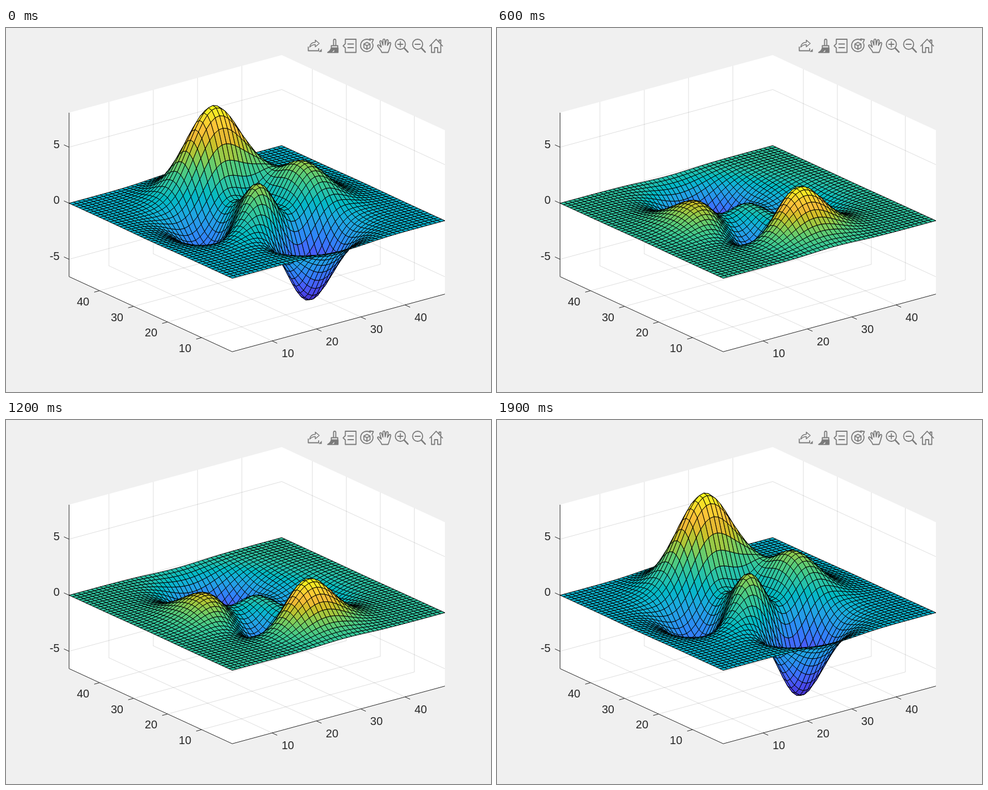
Write an HTML page with a canvas that moves like this. It is 864 px wide and 648 px high and loops after 2000 ms.

```html
<!DOCTYPE html>
<html lang="en">
<head>
<meta charset="utf-8">
<title>Oscillating surface</title>
<style>
  html, body { margin: 0; width: 100%; height: 100%; overflow: hidden; background: #f0f0f0; }
  svg, canvas { position: absolute; left: 0; top: 0; width: 864px; height: 648px; }
  text { font: 20px "Liberation Sans", Arial, sans-serif; fill: #262626; dominant-baseline: central; }
  .grid { stroke: #262626; stroke-opacity: .15; fill: none; }
  .axis { stroke: #262626; fill: none; }
  .icons { fill: none; stroke: #7b7b7b; stroke-width: 1.8; stroke-linejoin: round; stroke-linecap: round; }
  .icons .solid { fill: #7b7b7b; stroke: none; }
</style>
</head>
<body>
<svg viewBox="0 0 864 648">
  <g id="axes"></g>
  <g class="icons">
    <!-- export -->
    <path d="M541 34C542 28 546 25.500 551 25.500V21.500L558 27.500L551 33.500V29.500C547 29.500 544 31 541 34Z" stroke-width="1.500"/>
    <path d="M538.500 34V40.500H557V37"/>
    <path class="solid" d="M562.500 37V42.500H557Z"/>
    <!-- brush -->
    <path d="M583.500 31V22Q583.500 20 585.500 20T587.500 22V31M579.500 31.500H591V35.500H579.500ZM579.500 35.500Q578 41 573 43.500H591.500V35.500"/>
    <path class="solid" d="M579.500 35H591.500V43.500H584L585 39L580 43.500H574Q578 40 579.500 35Z"/>
    <!-- data tip -->
    <path d="M604.500 20H623.500V43.500H604.500V35.500L600.500 31.800L604.500 28ZM609 28.500H619M609 35H619"/>
    <!-- rotate -->
    <path d="M649 22A11 11 0 1 0 653.300 28M648 19.500L654.500 20.500L652 26.500"/>
    <path d="M643 25.500L648.500 28.500V35L643 38L637.500 35V28.500ZM637.500 28.500L643 31.500L648.500 28.500M643 31.500V38"/>
    <!-- pan -->
    <path d="M669.500 43.500C668 39 664 35.500 662 32C661.500 29.500 664.500 29.500 666 31.500L668.500 34L666 24.500C666 22 668.800 21.800 669.500 24.500L671.500 30.500L671.500 21.500C672 19 674.800 19 675 21.500L675.500 30L677.500 22C678.500 20 681 20.500 680.800 23L679.500 31L682.500 26.500C684 25 686 26 685.300 28.500C684 33 683 39 680.500 43.500Z"/>
    <!-- zoom in, zoom out -->
    <circle cx="702.500" cy="29" r="9"/>
    <path d="M702.500 24.500V33.500M698 29H707"/>
    <path d="M709.500 36L716 42.800" stroke-width="2.600"/>
    <circle cx="733.300" cy="29" r="9"/>
    <path d="M728.800 29H737.800"/>
    <path d="M740.300 36L746.800 42.800" stroke-width="2.600"/>
    <!-- home -->
    <path d="M755 32L766.300 20L777.600 32M758 30V43.500H763.500V35H769V43.500H774.500V30M774.500 27V21.500H771.500V24.500" />
  </g>
</svg>
<canvas id="surface" width="864" height="648"></canvas>
<script>
const SIZE = 49, STEP_MS = 100, STEPS = 20;
const STOPS = ('3e26a8 4332cb 4741e5 4852f4 4563fd 3875fe 2e87f7 2797eb 20a5e3 12b1d6 02bac3 ' +
  '24c1ae 37c897 57cc7a 81cc59 abc739 d1bf27 f0ba36 fec338 fad62d f5e924 f9fb15')
  .split(' ').map(hex => [0, 2, 4].map(k => parseInt(hex.slice(k, k + 2), 16)));

function peaks(x, y) {
  return 3 * (1 - x) ** 2 * Math.exp(-x * x - (y + 1) ** 2)
    - 10 * (x / 5 - x ** 3 - y ** 5) * Math.exp(-x * x - y * y)
    - Math.exp(-((x + 1) ** 2) - y * y) / 3;
}

// heights[column][row]
const heights = Array.from({ length: SIZE }, (_, i) =>
  Array.from({ length: SIZE }, (_, j) => peaks(i / 8 - 3, j / 8 - 3)));
const zMin = Math.min(...heights.flat()), zMax = Math.max(...heights.flat());

// Orthographic projection of data coordinates (x and y run from 1 to 49)
function project(x, y, z) {
  const u = (x - 1) / 48, v = (y - 1) / 48, w = (z - zMin) / (zMax - zMin);
  return [403 + 378.9 * u - 290.7 * v, 576.3 - 102.6 * u - 133.7 * v - 291.8 * w];
}

function buildAxes() {
  const parts = [];
  const path = (cls, ...pts) => parts.push(`<path class="${cls}" d="M${pts.map(p => p.map(n => n.toFixed(2))).join('L')}"/>`);
  const tick = (p, dx, dy) => path('axis', p, [p[0] + dx, p[1] + dy]);
  const label = (value, x, y, anchor) => parts.push(`<text x="${x}" y="${y}" text-anchor="${anchor}">${value}</text>`);
  const left = project(1, 49, zMin), front = project(1, 1, zMin), right = project(49, 1, zMin);
  const walls = [left, project(1, 49, zMax), project(49, 49, zMax), project(49, 1, zMax), right, front];
  parts.push(`<polygon fill="#fff" points="${walls.join(' ')}"/>`);

  for (const n of [10, 20, 30, 40]) {
    const px = project(n, 1, zMin), py = project(1, n, zMin);
    path('grid', px, project(n, 49, zMin), project(n, 49, zMax));
    path('grid', py, project(49, n, zMin), project(49, n, zMax));
    tick(px, 9.1, 4.2);
    tick(py, -9.7, 2.6);
    label(n, px[0] + 28, px[1] + 22, 'middle');
    label(n, py[0] - 29.5, py[1] + 19, 'middle');
  }
  for (const z of [-5, 0, 5]) {
    const p = project(1, 49, z);
    path('grid', p, project(49, 49, z), project(49, 1, z));
    tick(p, -9.1, -4.2);
    label(z, 95.5, p[1] - 5.5, 'end');
  }
  path('axis', project(1, 49, zMax), left, front, right);
  document.getElementById('axes').innerHTML = parts.join('');
}

function colorAt(level) {
  const pos = Math.min(Math.floor(level * 256), 255) / 255 * (STOPS.length - 1);
  const k = Math.min(Math.floor(pos), STOPS.length - 2);
  return `rgb(${STOPS[k].map((c, n) => Math.round(c + (STOPS[k + 1][n] - c) * (pos - k)))})`;
}

const ctx = document.getElementById('surface').getContext('2d');
ctx.lineWidth = 1;
ctx.lineJoin = 'round';
ctx.strokeStyle = '#000';

function drawSurface(step) {
  const scale = Math.cos(2 * Math.PI * step / STEPS);
  const points = heights.map((col, i) => col.map((z, j) => project(i + 1, j + 1, z * scale)));
  ctx.clearRect(0, 0, 864, 648);
  // Back to front; colours always span the full range, even when flat
  for (let i = SIZE - 2; i >= 0; i--) {
    for (let j = SIZE - 2; j >= 0; j--) {
      const level = (heights[i][j] - zMin) / (zMax - zMin);
      ctx.fillStyle = colorAt(scale > 0 ? level : 1 - level);
      ctx.beginPath();
      ctx.moveTo(...points[i][j]);
      ctx.lineTo(...points[i + 1][j]);
      ctx.lineTo(...points[i + 1][j + 1]);
      ctx.lineTo(...points[i][j + 1]);
      ctx.closePath();
      ctx.fill();
      ctx.stroke();
    }
  }
}

let shown = 0;
function tickFrame() {
  const step = Math.floor(performance.now() / STEP_MS) % STEPS + 1;
  if (step !== shown) drawSurface(shown = step);
  requestAnimationFrame(tickFrame);
}

buildAxes();
tickFrame();
</script>
</body>
</html>
```
